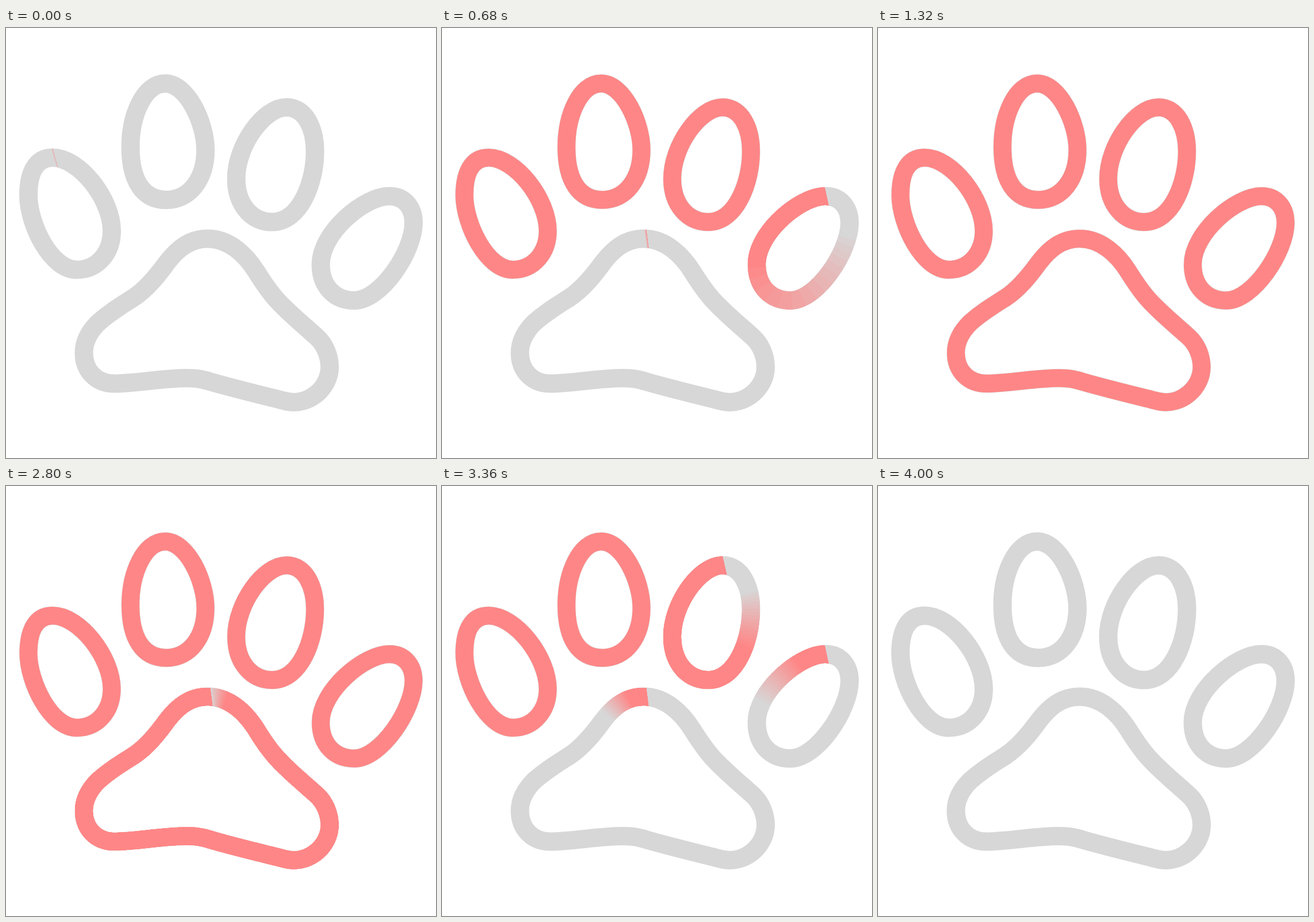
Animation, 748 px wide and 748 px high, one loop 4800 ms. Source, as an HTML page with a canvas:

```html
<!DOCTYPE html>
<html lang="en">
<head>
<meta charset="utf-8">
<title>Paw outline</title>
<style>
html, body { margin: 0; width: 100%; height: 100%; overflow: hidden; background: #fff; }
canvas { display: block; width: 100vmin; height: 100vmin; }
</style>
</head>
<body>
<canvas id="stage" width="748" height="748"></canvas>
<script>
const ctx = document.getElementById('stage').getContext('2d');
const LOOP = 4800, STEP = 40, BLUR_SAMPLES = 16;
const GREY = [215, 215, 215], RED = [255, 134, 134];
const GREY_WIDTH = 32, RED_WIDTH = 31;

// draw / erase: [start, duration] in ms; skew tilts the seam, shift moves it along the path
const parts = [
  { d: 'M81 225.5C53 225.5 39 250 39 291C39 341 78 420.5 123 420.5C160 420.5 184 390 184 353C184 298 128 225.5 81 225.5Z',
    draw: [0, 420], erase: [3554, 430], skew: 13, shift: 0 },
  { d: 'M277 96.5C240 96.5 216.5 152 216.5 207C216.5 265 238 299 279 299C320 299 347 262 347 212C347 165 315 96.5 277 96.5Z',
    draw: [280, 210], erase: [3486, 256], skew: 24, shift: 0 },
  { d: 'M488 138C448 138 400.5 205 400.5 262C400.5 308 428 337.5 463 337.5C512 337.5 537.5 268 537.5 215C537.5 175 521 138 488 138Z',
    draw: [440, 210], erase: [3310, 245], skew: 12, shift: 0 },
  { d: 'M667 292.5C623 292.5 547.5 356 547.5 411C547.5 450 572 474 606 474C652 474 709 389 709 339C709 312 693 292.5 667 292.5Z',
    draw: [597, 190], erase: [3200, 240], skew: 9, shift: 1 },
  { d: 'M351 366.5C318 366.5 297 386 280 408C264 430 245 454 222 469C200 483 180 495 160 513' +
       'C143 530 135.5 548 135.5 565C135.5 597 158 618.5 188 618.5C230 618 272 609 315 609' +
       'C335 609 345 612 358 616C400 628 450 640 488 649.5C527 658 563 626 563 590' +
       'C563 571 555 551 541 538C518 517 493 497 471 473C455 455 445 439 435 423C418 396 389 366.5 351 366.5Z',
    draw: [660, 650], erase: [2797, 650], skew: 7, shift: -3.5 }
];

for (const p of parts) {
  p.shape = new Path2D(p.d);
  p.line = document.createElementNS('http://www.w3.org/2000/svg', 'path');
  p.line.setAttribute('d', p.d);
  p.len = p.line.getTotalLength();
  const count = Math.round(p.len / 3);
  p.rim = [];
  for (let i = 0; i <= count; i++) p.rim.push(rimPair(p, i / count));
}

function offsetPoint(p, s, dist) {
  const at = v => p.line.getPointAtLength((v % p.len + p.len) % p.len);
  const a = at(s - 0.5), b = at(s + 0.5);
  const dx = b.x - a.x, dy = b.y - a.y, h = Math.hypot(dx, dy) || 1;
  return [(a.x + b.x) / 2 + dy / h * dist, (a.y + b.y) / 2 - dx / h * dist];
}

// outer and inner edge points at fraction f of the outline
function rimPair(p, f) {
  const s = f * p.len + p.shift;
  const near = Math.max(0, 1 - Math.min(f, 1 - f) * p.len / 100);
  return [
    offsetPoint(p, s, -RED_WIDTH / 2),
    offsetPoint(p, s - p.skew * near * near, RED_WIDTH / 2)
  ];
}

function easeInOut(x, power) {
  x = Math.min(1, Math.max(0, x));
  return x < 0.5 ? Math.pow(2 * x, power) / 2 : 1 - Math.pow(2 - 2 * x, power) / 2;
}

function progress(p, t) {
  const run = ([start, time], power) => easeInOut((t - start) / time, power);
  return t < 2000 ? run(p.draw, 3) : 1 - run(p.erase, 1.5);
}

function mix(k) {
  return 'rgb(' + GREY.map((g, i) => Math.round(g + (RED[i] - g) * k)) + ')';
}

function strokeAll(p, width, color) {
  ctx.lineWidth = width;
  ctx.strokeStyle = color;
  ctx.stroke(p.shape);
}

function fillStrip(p, f, color) {
  const pairs = p.rim.slice(0, Math.floor(f * (p.rim.length - 1)) + 1);
  pairs.push(rimPair(p, f));
  ctx.beginPath();
  for (const [outer] of pairs) ctx.lineTo(...outer);
  for (const [, inner] of pairs.reverse()) ctx.lineTo(...inner);
  ctx.closePath();
  ctx.fillStyle = color;
  ctx.fill();
}

function drawPart(p, t) {
  strokeAll(p, GREY_WIDTH, mix(0));
  const fronts = [];
  for (let i = 0; i < BLUR_SAMPLES; i++) {
    fronts.push(progress(p, t + STEP * (i + 0.5) / BLUR_SAMPLES));
  }
  fronts.sort((a, b) => b - a);
  // longest strip first; shorter ones cover it with stronger colour
  fronts.forEach((f, i) => {
    if (f <= 0 || f === fronts[i + 1]) return;
    const color = mix((i + 1) / BLUR_SAMPLES);
    if (f >= 1) strokeAll(p, RED_WIDTH, color);
    else fillStrip(p, f, color);
  });
}

function render(t) {
  ctx.fillStyle = '#fff';
  ctx.fillRect(0, 0, 748, 748);
  for (const p of parts) drawPart(p, t);
}

const origin = performance.now();
function tick() {
  const t = (performance.now() - origin) % LOOP;
  render(Math.floor(t / STEP) * STEP);
  requestAnimationFrame(tick);
}
tick();
</script>
</body>
</html>
```
